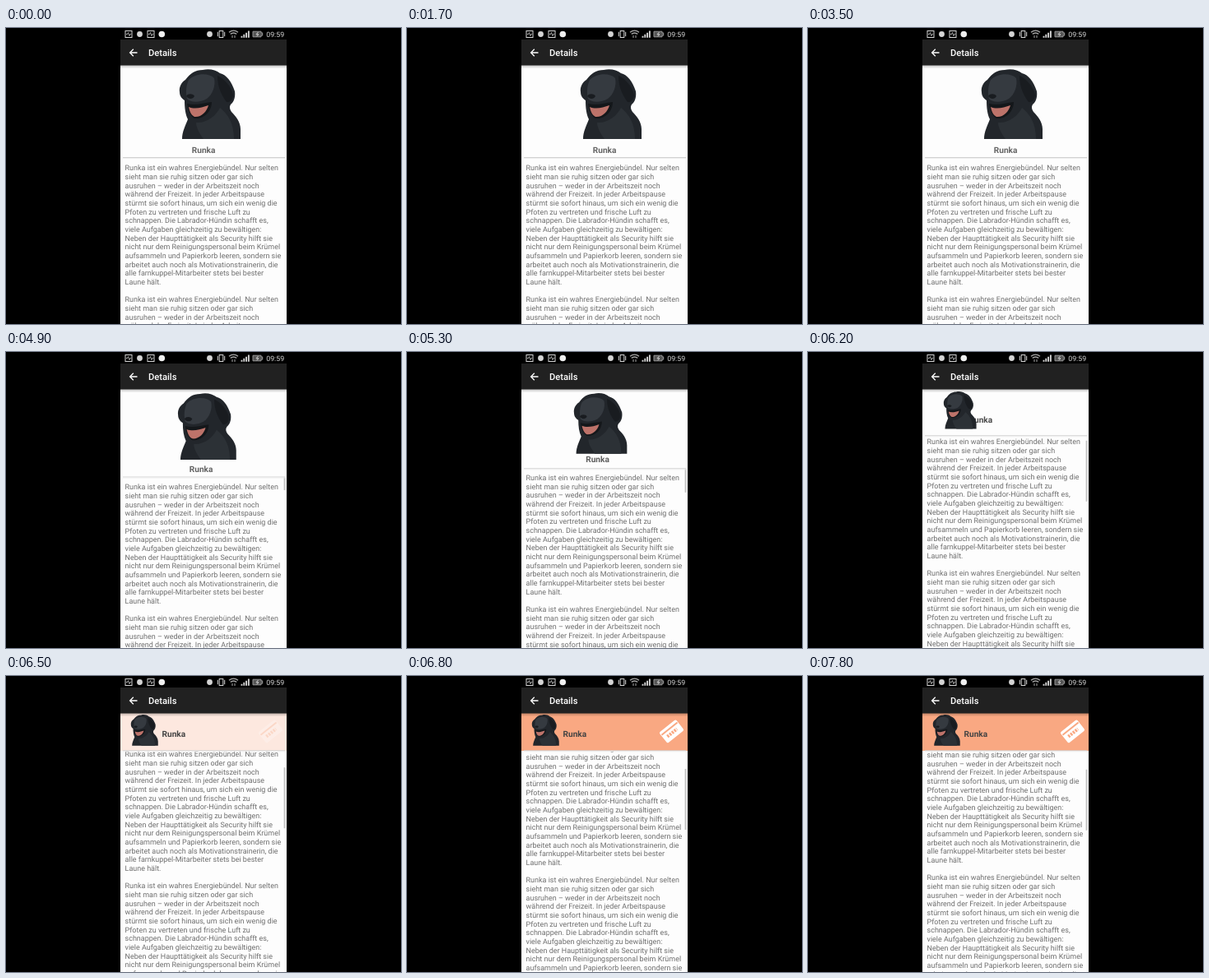
These frames come from a looping animation (480 by 360 pixels, 8 s). An HTML page:

```html
<!DOCTYPE html>
<html lang="de">
<head>
<meta charset="utf-8">
<title>Details</title>
<style>
  html, body { margin: 0; width: 100%; height: 100%; overflow: hidden; background: #000; }
  svg { display: block; width: 480px; height: 360px; }
  text { font-family: Roboto, sans-serif; text-rendering: geometricPrecision; }
  #body { font-size: 8.98px; fill: #6e6e6e; }
  #name { font-size: 10.1px; font-weight: 700; }
  .title { font-size: 11.2px; font-weight: 500; fill: #fff; }
  .clock { font-size: 8.8px; fill: #d4d4d4; }
  .line { fill: none; stroke: #d4d4d4; }
</style>
</head>
<body>
<svg viewBox="0 0 480 360">
  <defs>
    <clipPath id="screen"><rect x="139" y="45" width="202" height="315"/></clipPath>
    <linearGradient id="shade" x2="0" y2="1">
      <stop stop-color="#000" stop-opacity=".24"/>
      <stop offset="1" stop-color="#000" stop-opacity="0"/>
    </linearGradient>
    <g id="monitor" class="line">
      <rect x="-4" y="-4" width="8" height="8"/>
      <path d="M-3 0h1.5l1-2 1.5 4 1-2h1" stroke-width=".8"/>
    </g>
  </defs>
  <rect width="480" height="360"/>

  <g clip-path="url(#screen)">
    <rect x="139" y="45" width="202" height="315" fill="#fdfdfd"/>
    <g id="body"></g>
    <rect id="bar" x="337.6" width="2" height="74" fill="#c6c6c6"/>

    <g id="header">
      <rect id="panel" x="139" y="45" width="202" fill="#fdfdfd"/>
      <rect id="tint" x="139" y="45" width="202" height="46" fill="#f9a882"/>
      <g id="edge">
        <rect x="142" y="-.7" width="197" height="1" fill="#d2d2d2"/>
        <rect x="142" y=".3" width="197" height="1" fill="#eee"/>
      </g>
      <text id="name">Runka</text>
      <g id="dog">
        <path fill="#22262b" d="M10 13C16 5 22 1 31 1C39-1 47 1 52 5C60 7 66 15 70 27C71 34 69 40 65 43C63 46 64 49 66 52C71 57 77 64 77 73V85H6C6 76 10 69 13 61C10 55 9 47 9 38C6 36 3 33 3 28C2 22 5 16 10 13Z"/>
        <path fill="#353a40" d="M14 13C22 5 38 4 45 11C47 20 43 31 36 36C28 41 16 41 12 36C10 29 11 19 14 13Z"/>
        <path fill="#191c20" d="M49 8C58 12 66 22 68 31C68 37 64 41 60 40C54 32 49 22 49 8ZM11 33C13 29 20 30 21 33C19 37 14 37 11 33Z"/>
        <path fill="#14171a" d="M12 42C22 45 33 41 42 40C42 51 33 61 21 60C16 57 13 50 12 42Z"/>
        <path fill="#bd736a" d="M14 46C21 49 30 47 38 44C36 52 29 59 21 58C17 56 15 51 14 46Z"/>
        <path fill="#2c3136" d="M23 65C36 66 47 57 52 47C62 55 69 66 69 85H32C27 78 23 71 23 65Z"/>
      </g>
      <g id="card" transform="translate(321.5 67.3) rotate(-38.5)">
        <rect x="-13" y="-8.3" width="26" height="16.6" rx="2" fill="#fff"/>
        <path d="M-12.2-4H12.2" stroke="#f9a882" stroke-width="2"/>
        <path d="M-8 1.8H7" stroke="#f9a882" stroke-width="4" stroke-dasharray="2.4 1.2"/>
      </g>
    </g>
    <rect x="139" y="45" width="202" height="4.5" fill="url(#shade)"/>
  </g>

  <rect x="139" y="14" width="202" height="31.5" fill="#212121"/>
  <path d="M159.5 30H151M154.8 25.8L150.6 30L154.8 34.2" fill="none" stroke="#fff" stroke-width="1.3"/>
  <text class="title" x="172.9" y="34">Details</text>

  <use href="#monitor" x="149" y="7.5"/>
  <circle cx="162.5" cy="7.5" r="3.4" fill="#d4d4d4"/>
  <use href="#monitor" x="176" y="7.5"/>
  <circle cx="189.3" cy="7.5" r="3.8" fill="#f0f0f0"/>
  <circle cx="247.5" cy="7.5" r="3.4" fill="#d4d4d4"/>
  <g class="line">
    <rect x="259.2" y="3.5" width="4.6" height="8"/>
    <path d="M257.3 4.8v5.4M265.7 4.8v5.4"/>
    <path d="M271 5.2Q276.5 1 282 5.2M272.8 7.4Q276.5 4.6 280.2 7.4" stroke-width="1.4" stroke="#aaa"/>
    <path d="M275 9v3M278 9v3" stroke="#aaa"/>
    <path d="M286.5 11.8v-2M289.3 11.8v-4M292.1 11.8v-6M294.9 11.8v-8.4" stroke-width="1.9"/>
    <path d="M300 4.2h10v1.7h1.7v3.2H310v1.7h-10z" fill="#555" stroke="#999"/>
    <path d="M306.5 5L304 7.8h3L304.6 10"/>
  </g>
  <text class="clock" x="316.2" y="10.6">09:59</text>
</svg>

<script>
const LOOP = 8000, STEP = 100, LEADING = 10.67, COLLAPSE = 73;
const lines = [
  'Runka ist ein wahres Energiebündel. Nur selten',
  'sieht man sie ruhig sitzen oder gar sich',
  'ausruhen – weder in der Arbeitszeit noch',
  'während der Freizeit. In jeder Arbeitspause',
  'stürmt sie sofort hinaus, um sich ein wenig die',
  'Pfoten zu vertreten und frische Luft zu',
  'schnappen. Die Labrador-Hündin schafft es,',
  'viele Aufgaben gleichzeitig zu bewältigen:',
  'Neben der Haupttätigkeit als Security hilft sie',
  'nicht nur dem Reinigungspersonal beim Krümel',
  'aufsammeln und Papierkorb leeren, sondern sie',
  'arbeitet auch noch als Motivationstrainerin, die',
  'alle farnkuppel-Mitarbeiter stets bei bester',
  'Laune hält.',
  ''
];
// time, scroll offset, speed
const drag = [
  [4400, 0, 0], [4900, 6, .024], [5700, 33, .047],
  [6200, 61, .055], [6800, 82, .009], [7600, 85, 0]
];

const $ = id => document.getElementById(id);
const clamp = v => Math.min(1, Math.max(0, v));
const mix = (a, b, k) => a + (b - a) * k;
const set = (id, attrs) => {
  for (const key in attrs) $(id).setAttribute(key, attrs[key]);
};

[...lines, ...lines].forEach((line, i) => {
  const el = document.createElementNS('http://www.w3.org/2000/svg', 'text');
  el.textContent = line;
  el.setAttribute('x', 144.6);
  el.setAttribute('y', 173.2 + i * LEADING);
  $('body').append(el);
});

function scrollAt(t) {
  if (t <= drag[0][0]) return 0;
  const i = drag.findIndex(p => p[0] >= t);
  if (i < 0) return drag.at(-1)[1];
  const [t0, y0, v0] = drag[i - 1], [t1, y1, v1] = drag[i];
  const d = t1 - t0, u = (t - t0) / d, w = 1 - u;
  return y0 * w * w * (1 + 2 * u) + y1 * u * u * (3 - 2 * u)
    + d * u * w * (v0 * w - v1 * u);
}

function draw(t) {
  const s = scrollAt(t), p = clamp(s / COLLAPSE);
  const bottom = mix(157.7, 91, p);
  const tint = clamp((t - 6400) / 400);
  const grey = Math.round(mix(102, 68, p));

  set('body', { transform: `translate(0 ${-s})` });
  set('bar', { y: 92.5 + s / 4, opacity: t >= 4500 ? 1 : 0 });
  set('panel', { height: bottom - 45 });
  set('edge', { transform: `translate(0 ${bottom})` });
  set('tint', { opacity: tint });
  set('card', { opacity: tint });
  set('name', {
    x: mix(225.8, 189.6, p), y: mix(152, 73.6, p),
    fill: `rgb(${grey},${grey},${grey})`
  });
  const x = mix(208, 150.5, p ** 1.4), y = 50 - 3 * p * p;
  set('dog', { transform: `translate(${x} ${y}) scale(${mix(1, .445, p)})` });
}

const start = performance.now();
function tick() {
  const t = (performance.now() - start) % LOOP;
  draw(Math.floor(t / STEP) * STEP);
  requestAnimationFrame(tick);
}
tick();
</script>
</body>
</html>
```
